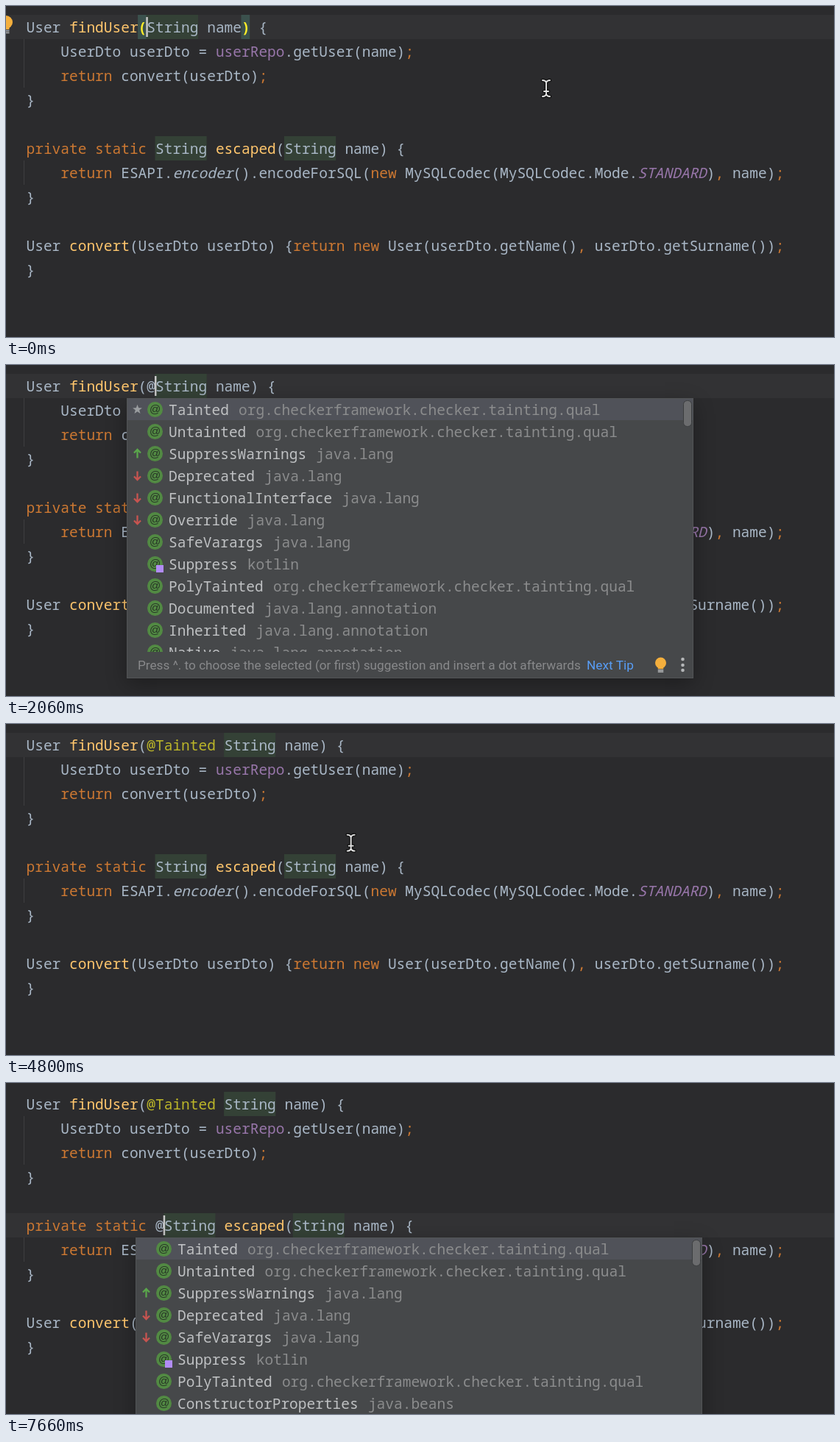
These frames come from a looping animation (1125x450 px, 8 s). An HTML page with a canvas:

```html
<!DOCTYPE html>
<html lang="en">
<head>
<meta charset="utf-8">
<title>Code completion</title>
<style>
html, body { margin: 0; overflow: hidden; background: #2b2b2d; }
canvas { display: block; }
</style>
</head>
<body>
<canvas id="stage" width="1125" height="450"></canvas>
<script>
const ctx = document.getElementById('stage').getContext('2d');
const LOOP = 8000, FRAME = 1000 / 15;
const LEFT = 27, CHAR = 11.7, TOP = 12, LINE = 33;
const MONO = '19.5px "Noto Sans Mono", "DejaVu Sans Mono", monospace';
const SANS = '17.2px Roboto, "Liberation Sans", sans-serif';

// First letter of each token: d plain, k keyword, m method, f field,
// c constant, i italic, a annotation, s highlighted usage, b brace pair
const COLORS = { d: '#a9b7c6', k: '#cc7832', m: '#ffc66d', f: '#9876aa', c: '#9876aa',
  i: '#a9b7c6', a: '#bbb529', s: '#a9b7c6', b: '#a9b7c6' };

const CHECKER = 'org.checkerframework.checker.tainting.qual';
const LANG = 'java.lang', META = 'java.lang.annotation';
// Mark, name, package
const FIRST_LIST = [
  ['star', 'Tainted', CHECKER], ['', 'Untainted', CHECKER], ['up', 'SuppressWarnings', LANG],
  ['down', 'Deprecated', LANG], ['down', 'FunctionalInterface', LANG], ['down', 'Override', LANG],
  ['', 'SafeVarargs', LANG], ['', 'Suppress', 'kotlin'], ['', 'PolyTainted', CHECKER],
  ['', 'Documented', META], ['', 'Inherited', META], ['', 'Native', META]];
const SECOND_LIST = [
  ['', 'Tainted', CHECKER], ['', 'Untainted', CHECKER], ['up', 'SuppressWarnings', LANG],
  ['down', 'Deprecated', LANG], ['down', 'SafeVarargs', LANG], ['', 'Suppress', 'kotlin'],
  ['', 'PolyTainted', CHECKER], ['', 'ConstructorProperties', 'java.beans']];

const within = (t, from, to) => t >= from && t < to;
const column = n => LEFT + n * CHAR;

function rect(x, y, w, h, color) {
  ctx.fillStyle = color;
  ctx.fillRect(x, y, w, h);
}

function disc(x, y, r, color) {
  ctx.fillStyle = color;
  ctx.beginPath();
  ctx.arc(x, y, r, 0, 7);
  ctx.fill();
}

function text(str, x, y, color, font = '500 ' + MONO) {
  ctx.font = font;
  ctx.fillStyle = color;
  ctx.fillText(str, x, y);
}

function codeLine(row, source, braces) {
  let col = 0;
  for (const token of source.split('|')) {
    const kind = token[0], str = token.slice(1);
    const x = column(col), y = TOP + row * LINE, lit = kind === 'b' && braces;
    if (kind === 's') rect(x, y, str.length * CHAR, LINE, '#344136');
    if (lit) rect(x, y, CHAR, LINE, '#3b514d');
    const style = lit ? 'bold ' : 'ic'.includes(kind) ? 'italic 500 ' : '500 ';
    text(str, x + .5, y + 24, lit ? '#ffef28' : COLORS[kind], style + MONO);
    col += str.length;
  }
}

function code(t) {
  const note = t < 600 ? '' : t < 3730 ? 'd@|' : t < 4060 ? 'd@Tainted |' : 'a@Tainted|d |';
  rect(0, TOP + (t < 5930 ? 0 : 5) * LINE, 1125, LINE, '#323234');
  rect(24, 45, 1, 66, '#3d3d3f');
  rect(24, 210, 1, 33, '#3d3d3f');
  [
    `dUser |mfindUser|b(|${note}sString|d name|b)|d {`,
    'd    UserDto userDto = |fuserRepo|d.getUser(name)|k;',
    'k    return |dconvert(userDto)|k;',
    'd}',
    '',
    `kprivate static |${t < 7060 ? '' : 'd@|'}sString|d |mescaped|d(|sString|d name) {`,
    'k    return |dESAPI.|iencoder|d().encodeForSQL(|knew |dMySQLCodec(MySQLCodec.Mode.|cSTANDARD|d)|k,|d name)|k;',
    'd}',
    '',
    'dUser |mconvert|d(UserDto userDto) {|kreturn new |dUser(userDto.getName()|k,|d userDto.getSurname())|k;',
    'd}'
  ].forEach((line, row) => line && codeLine(row, line, t < 1000));
}

function caret(t) {
  const off = [[60, 530], [1600, 2060], [2600, 3060], [3600, 3730],
    [4460, 5000], [5600, 5930], [6600, 7060]];
  if (off.some(([from, to]) => within(t, from, to))) return;
  const col = t < 600 ? 14 : t < 3730 ? 15 : t < 5930 ? 22 : t < 7060 ? 15 : 16;
  rect(column(col) - .5, TOP + (t < 5930 ? 0 : 5) * LINE + 3, 2.5, 27, '#c8c8c8');
}

function bulb(x, y, r) {
  disc(x, y, r, '#f4af3d');
  rect(x - r * .5, y + r * .5, r, r * .6, '#f4af3d');
  rect(x - r * .5, y + r * 1.2, r, 1.8, '#a5a7a9');
  rect(x - r * .5, y + r * 1.5, r, 1.8, '#a5a7a9');
}

function mark(kind, x, y) {
  if (kind === 'star') {
    ctx.fillStyle = '#9a9da0';
    ctx.beginPath();
    for (let i = 0; i < 10; i++) {
      const a = i * Math.PI / 5, r = i % 2 ? 2.8 : 6.8;
      ctx.lineTo(x + r * Math.sin(a), y - r * Math.cos(a));
    }
    ctx.fill();
  } else if (kind) {
    const s = kind === 'up' ? -1 : 1;
    ctx.strokeStyle = s < 0 ? '#5aa64b' : '#c75450';
    ctx.lineWidth = 2.3;
    ctx.beginPath();
    ctx.moveTo(x, y - 6 * s);
    ctx.lineTo(x, y + 5 * s);
    ctx.moveTo(x - 4.5, y + 1 * s);
    ctx.lineTo(x, y + 5.5 * s);
    ctx.lineTo(x + 4.5, y + 1 * s);
    ctx.stroke();
  }
}

function item([kind, name, pack], x, y) {
  mark(kind, x + 14.5, y);
  disc(x + 38.5, y, 10.5, '#528a43');
  ctx.textAlign = 'center';
  text('@', x + 38.5, y + 4.5, '#263326', '15px "Liberation Sans", sans-serif');
  ctx.textAlign = 'left';
  if (pack === 'kotlin') rect(x + 40, y + 1.5, 10, 10, '#b18cf5');
  text(name, x + 57, y + 7.5, '#bfc1c3');
  text(pack, x + 58.5 + (name.length + 1) * CHAR, y + 7.5, '#8b8c8d');
}

function popup(x, y, age, list, selected, tip) {
  const filled = age >= 60, height = age < 130 ? 246 : 381;
  ctx.save();
  ctx.shadowColor = `rgba(0,0,0,${filled ? .3 : .2})`;
  ctx.shadowBlur = filled ? 26 : 10;
  ctx.shadowOffsetY = filled ? 8 : 4;
  rect(x, y, 770, height, filled ? '#46484a' : '#403f43');
  ctx.restore();
  ctx.strokeStyle = filled ? '#525456' : '#4b4a4e';
  ctx.lineWidth = 1;
  ctx.strokeRect(x + .5, y + .5, 769, height - 1);
  if (!filled) return;

  ctx.save();
  ctx.beginPath();
  ctx.rect(x, y, 770, Math.min(height, 345));
  ctx.clip();
  rect(x + 1, y + 1 + selected * 30, 768, 29, '#505259');
  list.forEach((entry, i) => item(entry, x, y + 15.5 + i * 30));
  ctx.restore();

  ctx.fillStyle = '#6b6c6e';
  ctx.strokeStyle = '#3c3e40';
  ctx.beginPath();
  ctx.roundRect(x + 756.5, y + 3.5, 11, 35, 5);
  ctx.fill();
  ctx.stroke();

  if (height < 381) return;
  text('Press ^. to choose the selected (or first) suggestion and insert a dot afterwards',
    x + 15, y + 369, '#88898b', SANS);
  text('Next Tip', x + 625, y + 369, '#589df6', SANS);
  if (tip) bulb(x + 725.5, y + 360, 7.5);
  for (const dy of [355, 363, 370]) disc(x + 755.5, y + dy, 2.3, '#b4b6b8');
}

function pointer(t) {
  if (within(t, 600, 4460) || t >= 7060) return;
  // Time, x, y
  const path = [[4460, 734, 112], [5130, 215, 209], [5330, 207, 191], [5600, 206, 191], [5660, 204.5, 190]];
  const now = Math.floor((t + 7) / FRAME) * FRAME;
  let [, x, y] = path[0];
  if (t >= 4460) for (let i = 1; i < path.length; i++) {
    const [t0, x0, y0] = path[i - 1], [t1, x1, y1] = path[i];
    if (now < t0) break;
    const p = Math.min(1, (now - t0) / (t1 - t0)), e = p * p * (3 - 2 * p);
    x = x0 + (x1 - x0) * e;
    y = y0 + (y1 - y0) * e;
  }
  const beam = new Path2D('M-5-11Q-1-11 0-8Q1-11 5-11M0-8V8M-5 11Q-1 11 0 8Q1 11 5 11M-3 4H3');
  ctx.save();
  ctx.translate(x, y);
  ctx.lineCap = 'round';
  for (const [width, color] of [[4.5, '#111'], [1.9, '#e4e4e4']]) {
    ctx.lineWidth = width;
    ctx.strokeStyle = color;
    ctx.stroke(beam);
  }
  ctx.restore();
}

function draw(t) {
  rect(0, 0, 1125, 450, '#2b2b2d');
  code(t);
  if (t < 600) bulb(0, 22, 9);
  if (within(t, 6860, 7060)) bulb(0, 187, 9);
  caret(t);
  if (within(t, 800, 3660)) {
    const tip = within(t, 1860, 2400) || within(t, 2930, 3260);
    popup(164, 45, t - 800, FIRST_LIST, within(t, 2400, 3260) ? 1 : 0, tip);
  }
  if (t >= 7260) popup(176, 210, t - 7260, SECOND_LIST, 0, false);
  pointer(t);
}

const start = performance.now();
function tick() {
  draw((performance.now() - start) % LOOP);
  requestAnimationFrame(tick);
}
tick();
</script>
</body>
</html>
```
